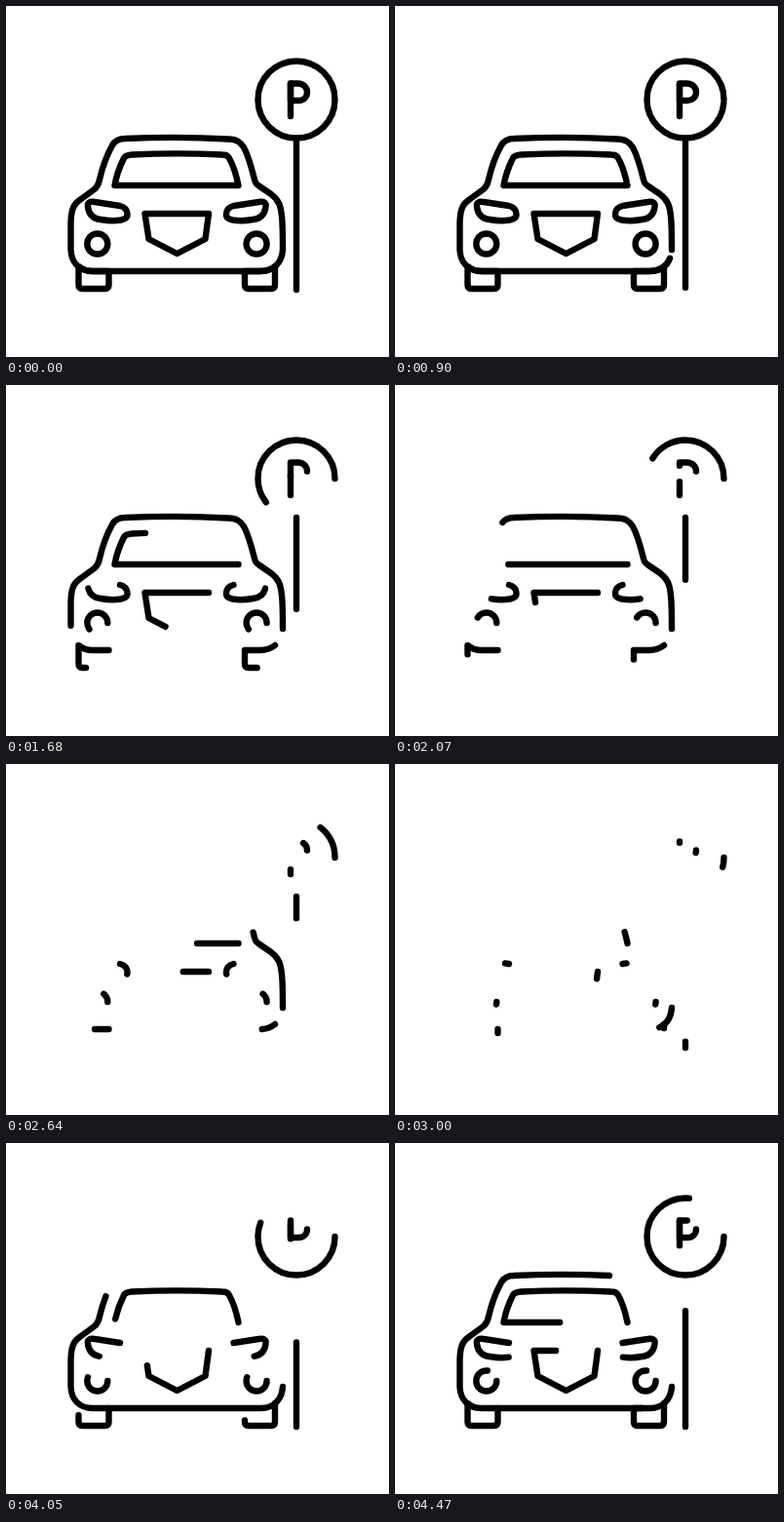
An HTML page that plays this animation: 393 px wide and 360 px high, repeating every 4.5 s.

```html
<!DOCTYPE html>
<html lang="en">
<head>
<meta charset="utf-8">
<title>Parking</title>
<style>
  html, body { margin: 0; width: 100%; height: 100%; overflow: hidden; background: #fff; }
  svg { display: block; width: 100%; height: 100%; }
  path {
    fill: none;
    stroke: #000;
    stroke-width: 6.4;
    stroke-linecap: round;
    stroke-linejoin: round;
    stroke-dasharray: 1 3;
    animation: trace 4500ms -3ms infinite;
  }
  .lamp { d: path("M117 205L91 201C86 200 83 202 84 206C85 214 89 218 97 219C105 220.5 112 220.5 118 219.5C123 218.5 125 216 124.5 213C124 208 121 206 117 205"); }
  .fog { d: path("M104.3 244a10.5 10.5 0 0 1-21 0a10.5 10.5 0 0 1 21 0"); }

  /* Offset 1 to 0 draws a line from its start; 0 to -1 erases it from its start. */
  @keyframes trace {
    0%      { stroke-dashoffset: 0;     animation-timing-function: step-end; }
    1.333%  { stroke-dashoffset: .189;  animation-timing-function: steps(3); }
    3.332%  { stroke-dashoffset: .145;  animation-timing-function: step-end; }
    3.333%  { stroke-dashoffset: 0;     animation-timing-function: step-end; }
    19.333% { stroke-dashoffset: 0;     animation-timing-function: steps(13); }
    28%     { stroke-dashoffset: -.186; animation-timing-function: steps(27); }
    46%     { stroke-dashoffset: -.588; animation-timing-function: steps(19); }
    58.666% { stroke-dashoffset: -.857; animation-timing-function: steps(10); }
    65.332% { stroke-dashoffset: -1;    animation-timing-function: step-end; }
    65.333% { stroke-dashoffset: 1;     animation-timing-function: steps(2); }
    66.666% { stroke-dashoffset: .96;   animation-timing-function: steps(21); }
    80.666% { stroke-dashoffset: .648;  animation-timing-function: steps(28); }
    99.333% { stroke-dashoffset: .234;  animation-timing-function: step-end; }
    100%    { stroke-dashoffset: 0; }
  }
</style>
</head>
<body>
<svg viewBox="0 0 393 360">
  <!-- sign -->
  <path pathLength="1" d="M337.5 96a39.5 39.5 0 0 1-79 0a39.5 39.5 0 0 1 79 0"/>
  <path pathLength="1" d="M298 291V136"/>
  <path pathLength="1" d="M292 79.5V113"/>
  <path pathLength="1" d="M309 88.5c0 5-4 8.500-9 8.500h-8V79.5h8c5 0 9 4 9 9"/>
  <!-- body and windscreen -->
  <path pathLength="1" d="M284 250C283 263 275 272 262 272H89C75 272 67 263 66.5 250V222C67 209 69 203 77 198L90 188.5C94 185.5 95 183 96 178C99 165 104 152 109 143C112 138 116 136 122 136C155 134.5 195 134.5 228 136.5C237 137 240 139 244 145C249 154 252 166 255 178C256 182 257 183 261 185.5L272 193C280 199 282 205 283 216C284 225 284 240 284 250"/>
  <path pathLength="1" d="M238.5 184C236 172 233 163 229 156C228 154 226 152.5 222 152.5C190 151 160 151 129 152.5C125 153 122 154 121 156C117 164 113 175 111.5 184H238.5"/>
  <!-- plate -->
  <path pathLength="1" d="M208 213L204.5 239L175.5 254L146.5 239L142.5 213H208"/>
  <!-- headlights -->
  <path class="lamp" pathLength="1"/>
  <path class="lamp" pathLength="1" transform="translate(350.5) scale(-1 1)"/>
  <!-- fog lights -->
  <path class="fog" pathLength="1"/>
  <path class="fog" pathLength="1" transform="translate(163.3)"/>
  <!-- wheels -->
  <path pathLength="1" d="M105.5 272V286Q105.5 290 101.5 290H78.500Q74.5 290 74.5 286V267C79 271 83 272 89 272H105.5"/>
  <path pathLength="1" d="M276 267V286Q276 290 272 290H249Q245 290 245 286V272H261C267 272 272 270 276 267"/>
</svg>
</body>
</html>
```
